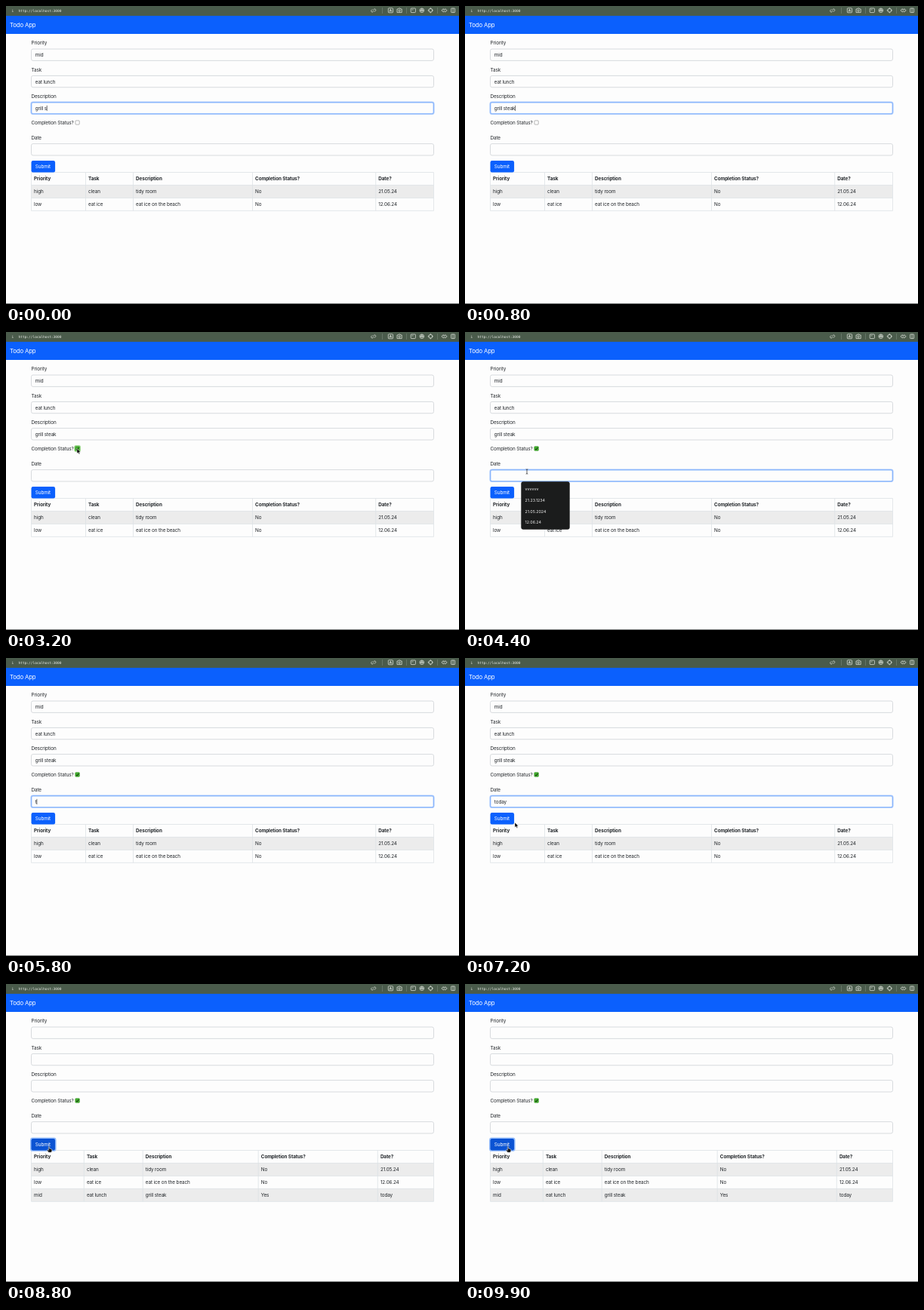
An HTML page for the animation above (10000 ms loop, 600 by 395 pixels).

```html
<!DOCTYPE html>
<html lang="en">
<head>
<meta charset="utf-8">
<title>Todo App</title>
<style>
  html, body { margin: 0; width: 100%; height: 100%; overflow: hidden; background: #fdfdfd; }
  svg { display: block; width: 600px; height: 395px; }
  text { font: 6.35px Inter, sans-serif; letter-spacing: -.11px; fill: #212529; white-space: pre; }
  .head { font-weight: 700; }
  .brand { font-size: 7.8px; letter-spacing: -.15px; fill: #fff; }
  .url { font: 4.5px "DejaVu Sans Mono", monospace; letter-spacing: 0; fill: #eef1ec; }
  .light { fill: #fff; }
  .menu text { font-size: 5.3px; letter-spacing: 0; fill: #f2f2f2; }
  .icons { fill: none; stroke: #dfe5dd; stroke-width: .75; }
  .grid { fill: none; stroke: #dee2e6; stroke-width: .8; }
  .field { fill: #fdfdfd; stroke: #ced2d6; stroke-width: .8; }
  .ring { fill: #fdfdfd; stroke: #b9d3fd; stroke-width: 2.2; }
  .edge { fill: none; stroke: #79abfb; stroke-width: .8; }
</style>
</head>
<body>
<svg viewBox="0 0 600 395">
  <rect width="600" height="395" fill="#fdfdfd"/>
  <rect width="600" height="13.5" fill="#4a5b4b"/>
  <rect y="13" width="600" height="24" fill="#0b60fd"/>
  <path d="M0 394.5H600" stroke="#77797a"/>
  <text class="url" x="7.6" y="8" font-weight="700">i</text>
  <text class="url" x="16.5" y="7.6">http://localhost:3000</text>
  <g class="icons">
    <path d="M486 5.4l1.3-1.3a1.4 1.4 0 0 1 2 2l-1.3 1.3M487.4 6l-1.3 1.3a1.4 1.4 0 0 1-2-2l1.1-1.1" transform="translate(0 .3)"/>
    <path d="M498.5 2V10M530.5 2V10M571.5 2V10" stroke="#6f7e70"/>
    <rect x="506.3" y="2.8" width="6.2" height="6" rx=".8"/>
    <path d="M508 7.6l1.4-3.6 1.4 3.6M508.5 6.4h1.8"/>
    <path d="M518 4h1.5l.6-1h2l.6 1h1.5v4.6H518z"/><circle cx="521.1" cy="6.2" r="1.2"/>
    <rect x="536.2" y="3" width="6.2" height="5.6" rx=".8"/><path d="M537.5 5h2"/>
    <circle cx="550.8" cy="5.8" r="2.8"/><circle cx="550.8" cy="5.8" r="1.2"/><path d="M548 5.8h5.6M550.8 3v2"/>
    <circle cx="562.3" cy="5.8" r="2.5"/><path d="M562.3 2.2v2M562.3 7.4v2M558.7 5.8h2M563.9 5.8h2"/>
    <path d="M579.5 3.4l-2.6 2.4 2.6 2.4M581.6 3.4l2.6 2.4-2.6 2.4M579 4.6h3M579 7h3"/>
    <rect x="589.6" y="3" width="5" height="5.6" rx=".6"/><path d="M592.1 3v5.6"/>
  </g>
  <text class="brand" x="5" y="28.4">Todo App</text>
  <g id="form"></g>
  <text x="33.5" y="157.3">Completion Status?</text>
  <rect id="checkRing" x="90.4" y="150.3" width="8.4" height="8.4" rx="1.8" fill="#8fc38c"/>
  <rect x="92" y="151.9" width="5.2" height="5.2" rx=".8" fill="#fff" stroke="#858585" stroke-width=".6"/>
  <g id="checked">
    <rect x="91.6" y="151.6" width="6" height="6" rx="1" fill="#41ad2d"/>
    <path d="M93 154.8l1.2 1.3 2.2-3" fill="none" stroke="#10240c"/>
  </g>
  <g id="before"></g>
  <g id="after"></g>
  <rect id="buttonRing" x="32" y="203.6" width="34.6" height="18.2" rx="3.4" fill="#94bdfc"/>
  <rect id="button" x="33.5" y="205.1" width="31.6" height="15.4" rx="2.3"/>
  <text class="light" x="38.8" y="215.2">Submit</text>
  <path id="caret" stroke="#111" stroke-width=".6"/>
  <g id="menu" class="menu">
    <rect x="74.3" y="198.3" width="64.4" height="63.4" rx="3" fill="#1b1c1c"/>
  </g>
  <g id="pointer">
    <path id="arrow" d="M0 0V6.6L1.6 5.2 2.7 7.6 3.8 7.1 2.8 4.8H4.8Z" fill="#000" stroke="#fff" stroke-width=".5"/>
    <path id="beam" d="M-1.3-3.2Q0-3.2 0-2.4 0-3.2 1.3-3.2M0-2.6V2.6M-1.3 3.2Q0 3.2 0 2.4 0 3.2 1.3 3.2" fill="none" stroke="#222" stroke-width=".7"/>
    <path id="hand" d="M-.7.6Q0-.5.7.6V3Q1.6 2.6 2 3.3 2.8 3 3.1 3.8 4 3.6 4 4.6 4 6.6 3 8H-.6Q-1.4 6.6-2.7 5.2-2.6 4-1.4 4.6L-.7 5.2Z" fill="#111" stroke="#fff" stroke-width=".55"/>
  </g>
</svg>
<script>
const $ = id => document.getElementById(id);
const LOOP = 10000, STEP = 100;
const label = (x, y, s, cls = '') => `<text x="${x}" y="${y}" class="${cls}">${s}</text>`;

const fields = [['priority', 'Priority', 57], ['task', 'Task', 92.4], ['desc', 'Description', 127.6], ['date', 'Date', 182.6]];
const box = (cls, y) => `<rect class="${cls}" x="33.5" y="${y}" width="533" height="15.4" rx="2.3"/>`;
$('form').innerHTML = fields.map(([id, name, y]) =>
  label(33.5, y - 5.8, name) + box('field', y) +
  `<g id="${id}Focus">${box('ring', y)}${box('edge', y)}</g>` +
  `<text id="${id}" x="38.8" y="${y + 10.1}"></text>`).join('');

const header = ['Priority', 'Task', 'Description', 'Completion Status?', 'Date?'];
const todos = [
  ['high', 'clean', 'tidy room', 'No', '21.05.24'],
  ['low', 'eat ice', 'eat ice on the beach', 'No', '12.06.24'],
  ['mid', 'eat lunch', 'grill steak', 'Yes', 'today']
];

function table(cols, rows) {
  const top = 220.5, height = 16.95, bottom = top + height * (rows.length + 1);
  let out = '', lines = '';
  [header, ...rows].forEach((row, r) => {
    const y = top + r * height;
    if (r % 2) out += `<rect x="33.5" y="${y}" width="533" height="${height}" fill="#ececec"/>`;
    row.forEach((s, c) => out += label(cols[c] + 3.6, y + 10.9, s, r ? '' : 'head'));
    lines += `M33.5 ${y}H566.5`;
  });
  lines += `M33.5 ${bottom}H566.5`;
  [...cols, 566.5].forEach(x => lines += `M${x} ${top}V${bottom}`);
  return out + `<path class="grid" d="${lines}"/>`;
}
$('before').innerHTML = table([33.5, 105.5, 168.5, 326.5, 489.7], todos.slice(0, 2));
$('after').innerHTML = table([33.5, 103.3, 181.2, 334.2, 492.3], todos);
$('menu').innerHTML += ['vvvvvv', '21.23.1234', '21.05.2024', '12.06.24']
  .map((s, i) => label(79.6, 210 + i * 14.8, s)).join('');

// Pointer path: time, x, y
const path = [[2000, 103, 168], [2400, 98, 160], [3000, 94, 154.5], [3300, 94, 154.5], [3800, 82, 185],
  [6800, 82, 185], [7200, 66, 218], [7500, 57, 215.3]];
const ease = u => u * u * (3 - 2 * u);
const ramp = (t, a, b) => Math.min(1, Math.max(0, (t - a) / (b - a)));

function pointerAt(t) {
  let i = 0;
  while (i < path.length - 2 && t >= path[i + 1][0]) i++;
  const [a, b] = [path[i], path[i + 1]], u = ease(ramp(t, a[0], b[0]));
  return [a[1] + (b[1] - a[1]) * u, a[2] + (b[2] - a[2]) * u];
}

const typed = (s, start, times, t) => s.slice(0, start + times.filter(k => t >= k).length);
const show = (id, on) => $(id).setAttribute('opacity', +on);

function render(t) {
  const sent = t >= 7700;
  const desc = typed('grill steak', 7, [100, 200, 400, 600], t);
  const date = typed('today', 0, [5700, 5900, 6100, 6300, 6500], t);
  const values = { priority: 'mid', task: 'eat lunch', desc, date };
  for (const id in values) $(id).textContent = sent ? '' : values[id];

  show('priorityFocus', 0);
  show('taskFocus', 0);
  show('descFocus', 1 - ramp(t, 900, 1200));
  show('dateFocus', ramp(t, 3800, 4000) * (1 - ramp(t, 7500, 7700)));
  show('checkRing', ramp(t, 1400, 1600) * (1 - ramp(t, 3800, 4000)));
  show('checked', t >= 3200);
  $('checkRing').setAttribute('fill', t >= 3200 ? '#8fd47c' : '#8fc38c');
  show('menu', t >= 4000 && t < 5700);
  show('before', !sent);
  show('after', sent);

  const active = t < 1000 ? 'desc' : t >= 5700 && t < 6800 ? 'date' : '';
  show('caret', active !== '');
  if (active) {
    const x = 38.9 + $(active).getComputedTextLength(), y = +$(active).getAttribute('y');
    $('caret').setAttribute('d', `M${x} ${y - 5.8}V${y + 1.4}`);
  }

  const [x, y] = pointerAt(t);
  const overButton = t > 7000 && x < 65 && y < 220.5;
  const overDate = y > 182.5 && y < 198;
  show('pointer', t >= 2000 && t < 5700 || t >= 6800);
  $('pointer').setAttribute('transform', `translate(${x} ${y})`);
  show('hand', overButton);
  show('beam', overDate);
  show('arrow', !overButton && !overDate);
  $('button').setAttribute('fill', overButton ? '#0b53d3' : '#0b60fd');
  show('buttonRing', ramp(t, 7500, 7700));
}

const begin = performance.now();
function frame() {
  const t = (performance.now() - begin) % LOOP;
  render(Math.floor(t / STEP) * STEP);
  requestAnimationFrame(frame);
}
frame();
</script>
</body>
</html>
```
